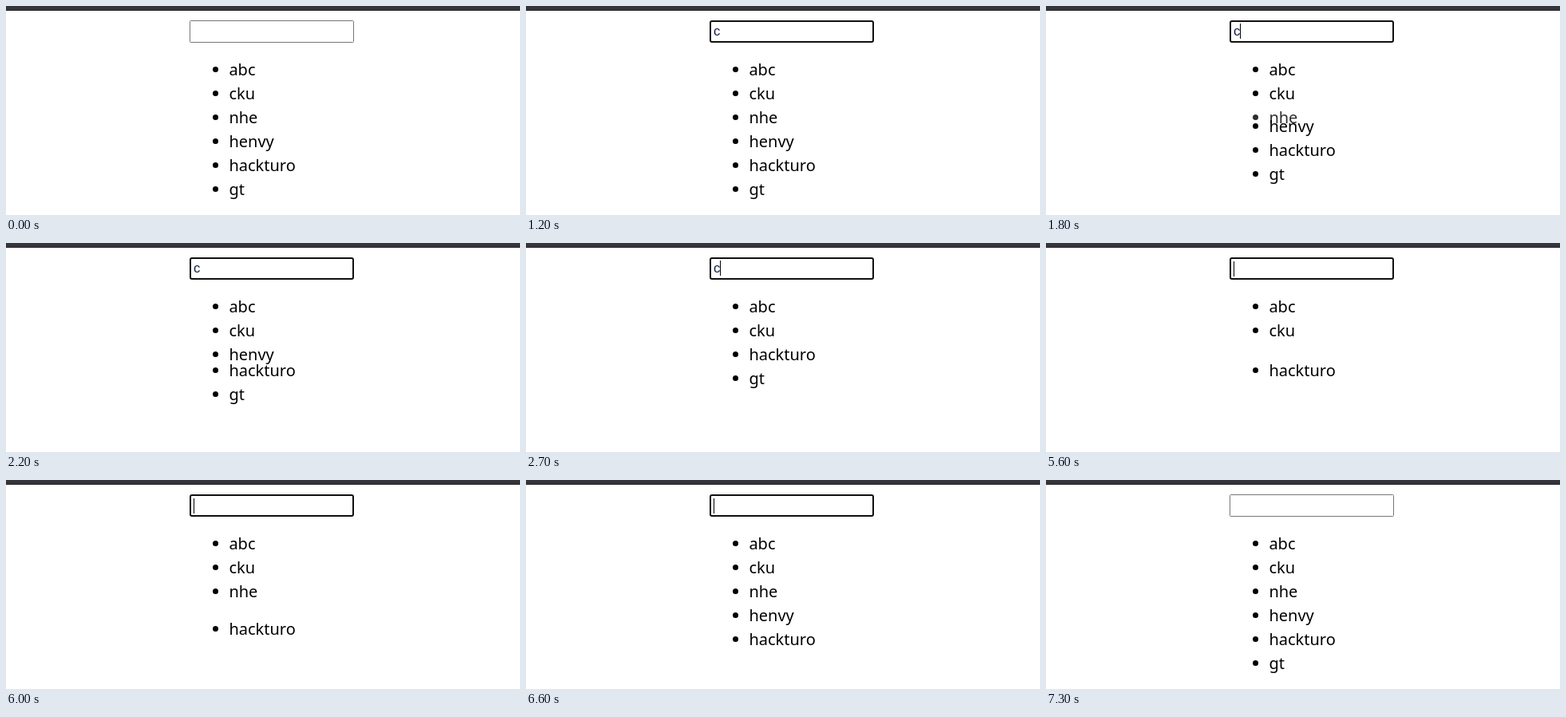
An HTML page for the animation above (7.4 s loop, 644 by 262 pixels).

```html
<!DOCTYPE html>
<html lang="en">
<head>
<meta charset="utf-8">
<title>Staggered list filter</title>
<style>
  html, body { margin: 0; width: 100%; height: 100%; overflow: hidden; background: #fff; }
  svg { display: block; width: 644px; height: 262px; }
  #list { font: 20px "Noto Sans", "Open Sans", sans-serif; }
  #typed { font: 16.67px "Liberation Sans", Arial, sans-serif; fill: #141e4c; }
  #field { fill: #fff; stroke: #767676; }
  #field.hover { stroke: #4f4f4f; }
  #field.focus { stroke: #101010; stroke-width: 2; }
</style>
</head>
<body>
<svg viewBox="0 0 644 262">
  <rect width="644" height="6" fill="#35343a"/>
  <rect y="5" width="644" height="1" fill="#29282d"/>
  <rect id="field"/>
  <text id="typed" x="235" y="37">c</text>
  <rect id="caret" width="1" height="19"/>
  <g id="list"></g>
</svg>
<script>
const LOOP = 7400, STEP = 100, ROW = 30, TWEEN = 500;
const TYPE = 700, ERASE = 4500, FOCUS = 500, BLUR = 7200;

// Rows that do not match the query leave and enter one after another.
const items = [
  { label: 'abc' },
  { label: 'cku' },
  { label: 'nhe', leave: 1605, enter: 5390 },
  { label: 'henvy', leave: 2105, enter: 5830 },
  { label: 'hackturo' },
  { label: 'gt', leave: 3080, enter: 6840 }
];

const byId = id => document.getElementById(id);
const field = byId('field'), typed = byId('typed'), caret = byId('caret');
const clamp = v => Math.min(1, Math.max(0, v));
const easeOut = p => 1 - (1 - p) ** 2;
const ramp = (t, from, to) => clamp((t - from) / (to - from));
const show = (el, on) => el.setAttribute('visibility', on ? 'visible' : 'hidden');

function setAttrs(el, attrs) {
  for (const name in attrs) el.setAttribute(name, attrs[name]);
  return el;
}

function add(parent, tag, attrs) {
  const el = document.createElementNS('http://www.w3.org/2000/svg', tag);
  return parent.appendChild(setAttrs(el, attrs));
}

for (const item of items) {
  item.row = add(byId('list'), 'g', {});
  add(item.row, 'circle', { cx: 262.5, cy: 79.5, r: 3.5 });
  add(item.row, 'text', { x: 279.4, y: 87 }).textContent = item.label;
}

function rowState({ leave, enter }, t) {
  if (!leave) return { height: ROW, alpha: 1 };
  const entering = t >= ERASE;
  const age = t - (entering ? enter : leave);
  const p = easeOut(clamp(age / TWEEN));
  return entering
    ? { height: ROW * p, alpha: ramp(age, 300, 450) }
    : { height: ROW * (1 - p), alpha: 1 - ramp(age, 150, 400) };
}

function drawField(t) {
  const focused = t >= FOCUS && t < BLUR;
  const hasText = t >= TYPE && t < ERASE;
  const inset = focused ? 1 : 0.5;
  field.setAttribute('class', focused ? 'focus' : t >= 200 && t < FOCUS ? 'hover' : '');
  setAttrs(field, {
    x: 230 + inset, y: 18 + inset,
    width: 206 - 2 * inset, height: 28 - 2 * inset,
    rx: focused ? 2 : 1
  });
  show(typed, hasText);

  // Each edit restarts the blink.
  const lastEdit = t >= ERASE ? 4600 : t >= TYPE ? TYPE : FOCUS;
  const blinkOn = t < lastEdit || Math.floor((t - lastEdit) / 500) % 2 === 0;
  setAttrs(caret, hasText ? { x: 243, y: 22 } : { x: 235, y: 23 });
  show(caret, focused && blinkOn);
}

function drawList(t) {
  let top = 0;
  for (const item of items) {
    const { height, alpha } = rowState(item, t);
    setAttrs(item.row, { transform: `translate(0 ${Math.round(top)})`, opacity: alpha });
    top += height;
  }
}

function render(now) {
  const t = Math.floor((now % LOOP) / STEP) * STEP;
  drawField(t);
  drawList(t);
}

const start = performance.now();
function frame() {
  render(performance.now() - start);
  requestAnimationFrame(frame);
}
frame();
</script>
</body>
</html>
```
